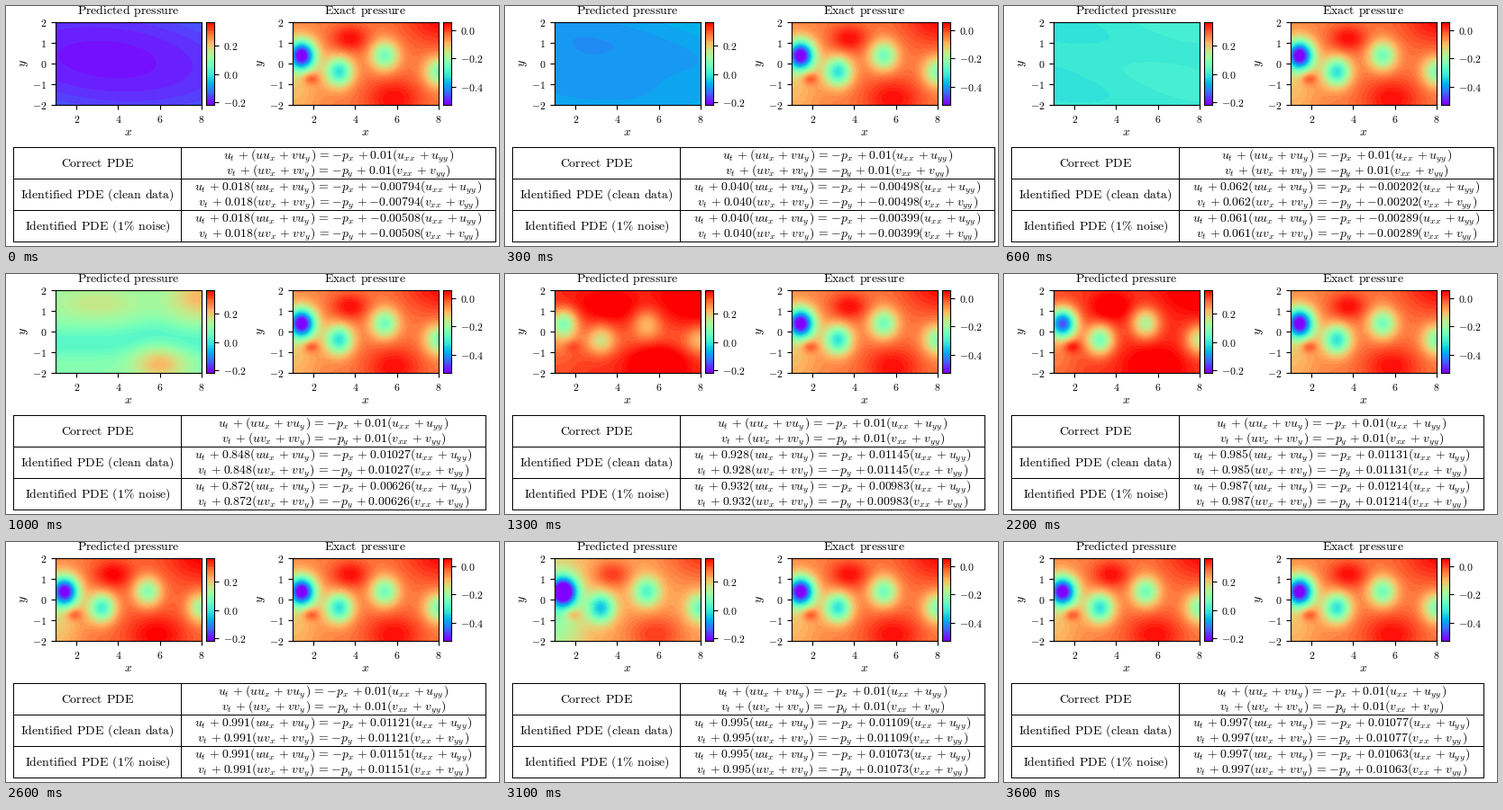
These frames come from a looping animation (547 px wide and 267 px high, 3700 ms). A matplotlib script:

```python
import numpy as np
import matplotlib.pyplot as plt
from matplotlib.animation import FuncAnimation

W, H, DPI = 547, 267, 100
FRAMES, STEP = 37, 100
TEXT, TICK = 9.95, 8.5

plt.rcParams.update({"mathtext.fontset": "cm", "figure.dpi": DPI,
                     "axes.linewidth": 0.8})

fig = plt.figure(figsize=(W / DPI, H / DPI), dpi=DPI, facecolor="white")
page = fig.add_axes([0, 0, 1, 1])
page.set(xlim=(0, W), ylim=(H, 0))
page.axis("off")


# ---- training progress --------------------------------------------------
# Key points of the identified coefficients: convection, then viscosity
TIMES = [0, 600, 1000, 1600, 2200, 3100, 3600]
CLEAN = ([.018, .062, .848, .966, .985, .995, .997],
         [-.00794, -.00202, .01027, .01264, .01131, .01109, .01077])
NOISY = ([.018, .061, .872, .964, .987, .995, .997],
         [-.00508, -.00289, .00626, .01340, .01214, .01073, .01063])


def coefficients(t, keys):
    """Convection closes in on 1 geometrically, viscosity moves linearly."""
    a, b = keys
    gap = np.exp(np.interp(t, TIMES, np.log(1 - np.array(a))))
    return 1 - gap, np.interp(t, TIMES, b)


# ---- text helpers -------------------------------------------------------
PLUS = r"\hspace{0.05}+\hspace{0.05}"
EQUALS = r"\hspace{0.12}=\hspace{0.12}"


def roman(s):
    return r"$\mathrm{%s}$" % s.replace("%", r"\%").replace(" ", r"\hspace{0.42}")


def number(s):
    return "$" + s.replace("-", "{-}") + "$"


def sub(var, index):
    return var + "_{" + r"\hspace{0.04}".join(index) + r"\hspace{0.14}}"


def equation(w, axis, a, b):
    """Momentum equation for velocity w along the given axis."""
    left = sub("u" + w, "x") + PLUS + sub("v" + w, "y")
    right = sub(w, "xx") + PLUS + sub(w, "yy")
    b = b.replace("-", "{-}")
    return ("$" + sub(w, "t") + PLUS + a + "(" + left + ")" + EQUALS + "{-}"
            + sub("p", axis) + PLUS + b + "(" + right + ")$")


def put(x, y, s, **kw):
    return page.text(x, y, s, size=TEXT, ha="center", va=kw.pop("va", "baseline"), **kw)


# ---- pressure fields, as colour map fractions ---------------------------
X, Y = np.meshgrid(np.linspace(1, 8, 162), np.linspace(2, -2, 92))


def bump(cx, cy, sx, sy):
    return np.exp(-((X - cx) / sx) ** 2 / 2 - ((Y - cy) / sy) ** 2 / 2)


def wake():
    """Vortex street: lows weaken and highs widen downstream, sides alternating."""
    f = .83 - .11 * bump(1, -.8, .9, 1.5)
    for k in range(4):
        side = (-1) ** k
        f -= (.3 + .52 * np.exp(-1.1 * k)) * bump(1.42 + 1.6 * k + .2 * k * k,
                                                  .4 * side, .46, .5)
        f += .15 * bump(1.85 + 1.8 * k + .1 * k * k, -side * (.72 + .5 * k),
                        .28 + .35 * k, .22 + .25 * k)
    return f


exact = wake()
start = .03 + .045 * ((X - 3.5) / 5) ** 2 + .05 * ((Y - .2 + .08 * (X - 3.5)) / 2) ** 2
flat = .37 + .012 * np.sin(.5 * X - 2) + .008 * np.sin(2.2 * Y + .5 * X)
band = -.55 + .4 * np.exp(-(X - 5.8) ** 2 / 2)
early = (.52 - .1 * np.exp(-((Y - band) / .5) ** 2 / 2) + .12 * bump(3, 1.4, 1.6, .6)
         + .22 * bump(8, 1.7, 1.1, .8) + .22 * bump(6, -1.6, .9, .6))
late = exact - .06 - .13 * bump(1, -.5, 1, 2)
fields = np.array([start, flat, early, .95 * exact + .55, .92 * exact + .16,
                   late, exact])

# ---- panels -------------------------------------------------------------
CMAP = plt.get_cmap("rainbow", 50)


def box(x, y, w, h):
    return fig.add_axes([x / W, 1 - (y + h) / H, w / W, h / H])


def shade(ax, data, extent):
    return ax.imshow(data, cmap=CMAP, vmin=0, vmax=1, extent=extent,
                     aspect="auto", interpolation="nearest")


def panel(x0, title, data, lo, hi, marks):
    ax = box(x0, 18, 162, 92)
    im = shade(ax, data, (1, 8, -2, 2))
    ax.set_xticks(range(2, 9, 2), [number(str(v)) for v in range(2, 9, 2)])
    ax.set_yticks(range(-2, 3), [number(str(v)) for v in range(-2, 3)])
    bar = box(x0 + 167, 18, 9, 92)
    shade(bar, np.linspace(1, 0, 92)[:, None], (0, 1, lo, hi))
    bar.set_xticks([])
    bar.yaxis.tick_right()
    bar.set_yticks(marks, [number(f"{v:.1f}") for v in marks])
    for a in (ax, bar):
        a.tick_params(labelsize=TICK)
    put(x0 + 81, 9, roman(title))
    put(x0 + 81, 144, "$x$")
    put(x0 - 35, 64, "$y$", rotation=90, va="center")
    return im


predicted = panel(55, "Predicted pressure", fields[0], -.216, .364, [-.2, 0, .2])
panel(318, "Exact pressure", exact, -.527, .057, [-.4, -.2, 0])

# ---- table --------------------------------------------------------------
LEFT, SPLIT, NARROW, WIDE = 8, 194, 532, 543
TOP, ROW = 157, 35
BOTTOM = TOP + 3 * ROW
line = dict(color="black", lw=0.72, solid_capstyle="projecting")

for x in (LEFT, SPLIT):
    page.plot([x, x], [TOP, BOTTOM], **line)
edge, = page.plot([WIDE, WIDE], [TOP, BOTTOM], **line)
rules = [page.plot([LEFT, WIDE], [TOP + ROW * k] * 2, **line)[0] for k in range(4)]

rows = []
for k, name in enumerate(["Correct PDE", "Identified PDE (clean data)",
                          "Identified PDE (1% noise)"]):
    y = TOP + ROW * k
    put((LEFT + SPLIT + 1) / 2, y + 21.7, roman(name))
    rows.append([put(0, y + dy, "") for dy in (13.3, 30.4)])


def update(i):
    t = i * STEP
    weights = [np.interp(t, TIMES, unit) for unit in np.eye(len(TIMES))]
    predicted.set_data(np.tensordot(weights, fields, 1))

    found = [coefficients(t, keys) for keys in (CLEAN, NOISY)]
    right = WIDE if min(b for _, b in found) < 0 else NARROW
    edge.set_xdata([right, right])
    for r in rules:
        r.set_xdata([LEFT, right])

    terms = [("", "0.01")] + [(f"{a:.3f}", f"{b:.5f}") for a, b in found]
    for pair, (a, b) in zip(rows, terms):
        for label, w, axis in zip(pair, "uv", "xy"):
            label.set_text(equation(w, axis, a, b))
            label.set_x((SPLIT + right + 1) / 2)
    return [predicted]


anim = FuncAnimation(fig, update, frames=FRAMES, interval=STEP,
                     repeat=True, repeat_delay=0, blit=False)
plt.show()
```
